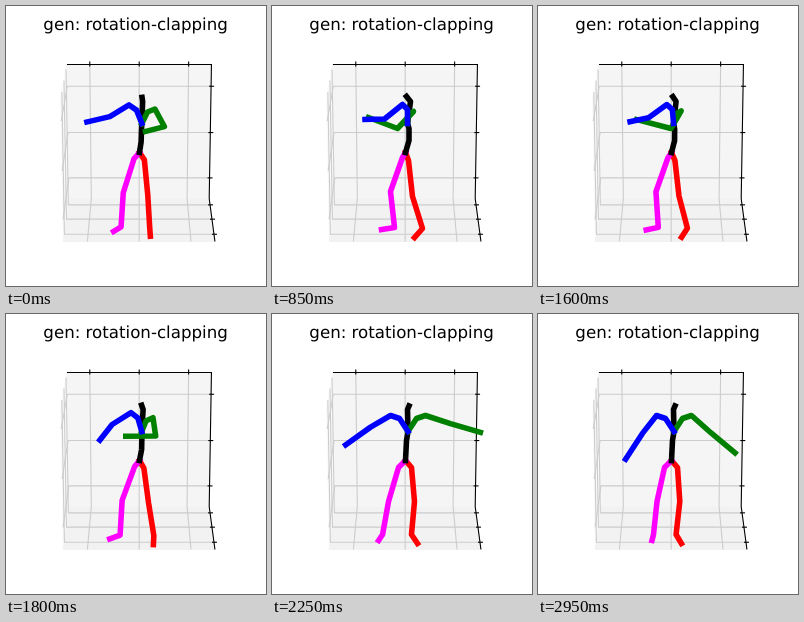
These frames come from a looping animation (260 px wide and 280 px high, 3000 ms). An HTML page:

```html
<!DOCTYPE html>
<html lang="en">
<head>
<meta charset="utf-8">
<title>Stick figure motion</title>
<style>
  html, body { margin: 0; width: 100%; height: 100%; overflow: hidden; background: #fff; }
  svg { display: block; width: 260px; height: 280px; }
  text { font: 16.67px "DejaVu Sans", sans-serif; text-anchor: middle; text-rendering: geometricPrecision; }
  .grid { fill: none; stroke: #ccc; stroke-width: 1.1; }
  .axis { fill: none; stroke: #000; stroke-width: 1.1; }
  .limb { fill: none; stroke-width: 5.56; stroke-linecap: square; stroke-linejoin: round; }
</style>
</head>
<body>
<svg viewBox="0 0 260 280">
  <text x="129.6" y="23.5">gen: rotation-clapping</text>
  <g id="room" transform="translate(0 .5)"></g>
  <g id="body" transform="translate(.5 .5)"></g>
</svg>
<script>
const LOOP = 3000, STEP = 50;
const room = document.getElementById('room');
const body = document.getElementById('body');

function path(parent, cls, d, attrs = {}) {
  const el = document.createElementNS('http://www.w3.org/2000/svg', 'path');
  el.setAttribute('class', cls);
  el.setAttribute('d', d);
  for (const k in attrs) el.setAttribute(k, attrs[k]);
  parent.appendChild(el);
  return el;
}
const toPath = pts => 'M' + pts.map(p => p[0].toFixed(2) + ' ' + p[1].toFixed(2)).join('L');

// Perspective box: u runs right, v down the back wall, d towards the viewer.
function project(u, v, d) {
  const w = 0.00692 + 0.000223 * v - 0.000542 * d;
  return [133.2 + (u - 0.5) / w, (0.4014 + 0.9701 * v + 0.1798 * d) / w];
}
const line = (...pts) => toPath(pts.map(p => project(...p)));

function drawRoom() {
  const ticks = [0.158, 0.5, 0.842];
  const pane = (fill, ...pts) => path(room, '', line(...pts) + 'Z', { fill, stroke: fill });
  pane('#f9f9f9', [0, 0, 0], [0, 1, 0], [0, 1, 1], [0, 0, 1]);
  pane('#f2f2f2', [0, 1, 0], [1, 1, 0], [1, 1, 1], [0, 1, 1]);
  pane('#f5f5f5', [0, 0, 0], [1, 0, 0], [1, 1, 0], [0, 1, 0]);
  for (const t of ticks) {
    path(room, 'grid', line([t, 0, 0], [t, 1, 0], [t, 1, 1]));
    path(room, 'grid', line([0, 0, t], [0, 1, t], [1, 1, t]));
    path(room, 'grid', line([0, t, 1], [0, t, 0], [1, t, 0]));
  }
  path(room, 'axis', line([0, 0, 0], [1, 0, 0], [1, 1, 0], [1, 1, 1]));
  for (const t of ticks) {
    const [x, y] = project(t, 0, 0);
    path(room, 'axis', `M${x} ${y - 3}v5`);
    for (const [sx, sy] of [project(1, t, 0), project(1, 1, t)])
      path(room, 'axis', `M${sx - 2} ${sy}h5`);
  }
}

const lerp = (a, b, k) => a + (b - a) * k;
const mix = (p, q, k) => [lerp(p[0], q[0], k), lerp(p[1], q[1], k)];

function ease(t, from, to) {
  const s = Math.min(1, Math.max(0, (t - from) / (to - from)));
  return s * s * (3 - 2 * s);
}

function rotate([x, y], [cx, cy], degrees) {
  const a = degrees * Math.PI / 180, c = Math.cos(a), s = Math.sin(a);
  return [cx + (x - cx) * c - (y - cy) * s, cy + (x - cx) * s + (y - cy) * c];
}

// open: 0 hands together, 1 arms spread; sag: mid-swing dip; low: arms coming down.
function motion(t) {
  return {
    open: 0.62 * (1 - ease(t, 0, 850)) + ease(t, 1400, 2250),
    sag: Math.sin(Math.PI * ease(t, 1400, 2250)) ** 2,
    low: ease(t, 2200, 2850)
  };
}

const ROOT = [133, 146];

// Joints blend from the closed to the open pose; lean moves a leg more the further it is from the hip.
function chain(pairs, open, lean = 0) {
  return pairs.map(([closed, spread], i) => {
    const [x, y] = mix(closed, spread, open);
    return [x + lean * i, y];
  });
}

function rightLeg({ open, sag, low }) {
  return [ROOT, ...chain([
    [[136, 154], [139, 153]],
    [[140, 190], [142, 187]],
    [[150, 222], [139, 220]],
    [[142, 231], [145, 229]]
  ], open, 1.2 * sag - 0.7 * low)];
}

function leftLeg({ open, sag, low }) {
  return [ROOT, ...chain([
    [[130, 151], [126, 153]],
    [[118, 185], [116, 187]],
    [[122, 221], [110, 220]],
    [[109, 223], [106, 226]]
  ], open, 2.5 * low - 1.5 * sag)];
}

function spine({ open }) {
  return [ROOT, ...chain([
    [[136.5, 134], [133.5, 136]],
    [[136.5, 122], [134, 126]],
    [[135, 117], [135.5, 117]],
    [[138, 95], [135, 95]],
    [[134, 90], [136.5, 91.5]]
  ], open)];
}

function arm(m, collar, shoulder, elbow, hand, drop) {
  const chest = spine(m)[3];
  return [chest, collar, shoulder, ...[elbow, hand].map(p => rotate(p, shoulder, drop * m.low))];
}

function rightArm(m) {
  const o = m.open;
  return arm(m,
    [136 + 8 * o, 108 - 4 * o],
    [141 + 12 * o, 105 - 4 * o],
    [125 + 53 * o, 122 - 13 * o ** 4],
    [96 + 112 * o ** 2, 111 + 6.5 * o + 68 * o ** 2 * (1 - o)],
    24);
}

function leftArm(m) {
  const o = m.open;
  return arm(m,
    [135 - 8 * o, 103 + o],
    [130 - 12 * o, 98 + 3 * o ** 4],
    [112 - 14 * o, 112.5 - 10 * o * (1 - o)],
    [92.5 - 19.5 * o + 10 * m.sag, 113 + 17 * o ** 4 + 12 * m.sag],
    -22);
}

drawRoom();
const limbs = [
  ['#f00', rightLeg], ['#f0f', leftLeg], ['#000', spine], ['#008000', rightArm], ['#00f', leftArm]
].map(([stroke, pose]) => ({ pose, el: path(body, 'limb', '', { stroke }) }));

const start = performance.now();
function tick() {
  const t = (performance.now() - start) % LOOP;
  const m = motion(Math.floor(t / STEP) * STEP);
  for (const { pose, el } of limbs) el.setAttribute('d', toPath(pose(m)));
  requestAnimationFrame(tick);
}
tick();
</script>
</body>
</html>
```
